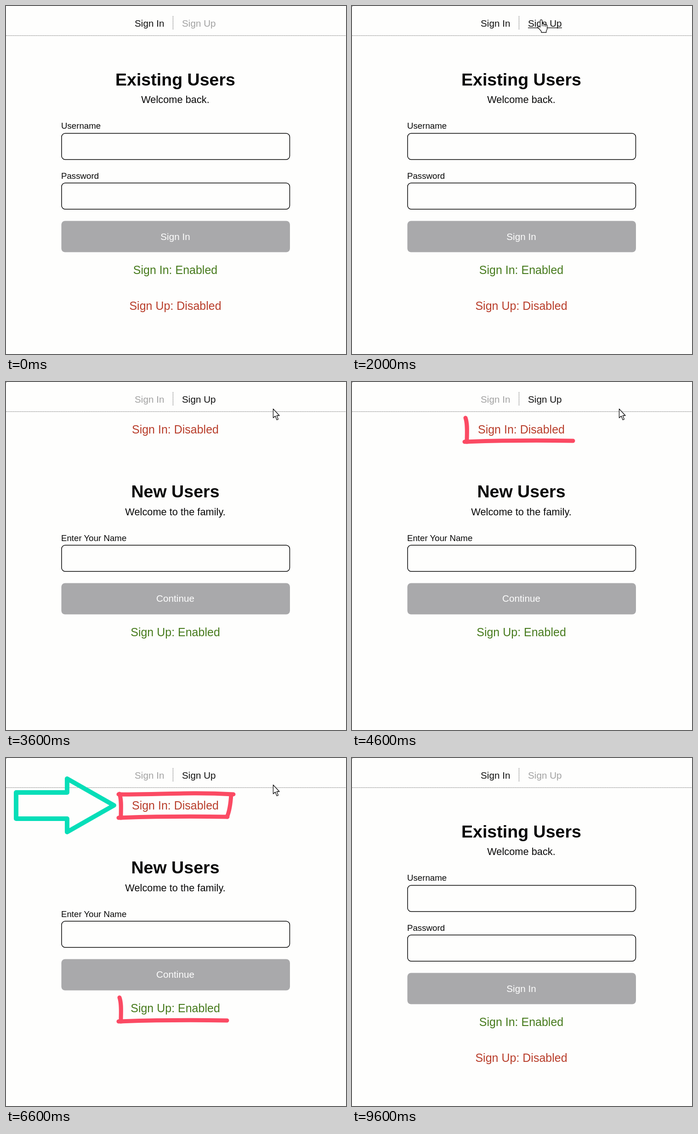
An HTML page for the animation above (9800 ms loop, 740x757 px).

```html
<!DOCTYPE html>
<html lang="en">
<head>
<meta charset="utf-8">
<title>Sign in and sign up</title>
<style>
  html, body { margin: 0; width: 100%; height: 100%; overflow: hidden; background: #fefefd; }
  svg { display: block; width: 740px; height: 757px; font-family: "Liberation Sans", Arial, sans-serif; }
  .nav, .button-text { font-size: 20.7px; }
  .title { font-size: 37.6px; font-weight: bold; }
  .intro { font-size: 21.8px; }
  .label { font-size: 18.7px; }
  .status { font-size: 25px; }
  .title, .intro, .status, .button-text { text-anchor: middle; }
  .title, .intro, .label { fill: #080808; }
  .button-text { fill: #fefefe; }
  .input { fill: none; stroke: #080808; stroke-width: 1.5; }
  .button { fill: #a9a9ab; }
  .dotted { stroke: #555; stroke-width: 1.2; stroke-dasharray: 1.25; }
  .cursor path { fill: #fff; stroke: #111; stroke-width: 1.3; stroke-linejoin: round; }
  .frame, .arrow { fill: none; stroke-linecap: round; stroke-linejoin: round; }
  .frame { stroke: #fb4a63; stroke-width: 9; }
  .arrow { stroke: #06deb8; stroke-width: 10; }
</style>
</head>
<body>
<svg viewBox="0 0 740 757">
  <defs>
    <clipPath id="clipIn"><rect id="areaIn" y="65" width="740"/></clipPath>
    <clipPath id="clipUp"><rect id="areaUp" y="143" width="740"/></clipPath>
    <g id="note">
      <g class="frame">
        <path d="M247 78C252 92 250 112 250 130"/>
        <path d="M245 130Q360 126 482 128"/>
        <path d="M481 128Q488 112 490 80"/>
        <path d="M245 79C320 81 390 73 495 79"/>
      </g>
      <g class="arrow">
        <path d="M219 112L235 103L133 45V75H22V132H133V161Z"/>
      </g>
    </g>
  </defs>

  <rect id="corner" width="1" height="1"/>
  <text id="navIn" class="nav" x="280" y="45">Sign In</text>
  <text id="navUp" class="nav" x="383" y="45">Sign Up</text>
  <path id="underline" d="M383 47.5H457" stroke="#222" stroke-width="1.4"/>
  <path class="dotted" d="M363.5 22V52M0 64.5H740"/>

  <g clip-path="url(#clipIn)">
    <text class="title" x="368.5" y="173">Existing Users</text>
    <text class="intro" x="368.5" y="211">Welcome back.</text>
    <text class="label" x="120" y="267">Username</text>
    <rect class="input" x="121" y="277" width="496.5" height="57" rx="8"/>
    <text class="label" x="120" y="376">Password</text>
    <rect class="input" x="121" y="385" width="496.5" height="57" rx="8"/>
    <rect class="button" x="120.5" y="467.5" width="497.5" height="68" rx="8"/>
    <text class="button-text" x="368.5" y="508.5">Sign In</text>
  </g>
  <text id="statusIn" class="status" x="368.5"></text>

  <g id="formUp">
    <g clip-path="url(#clipUp)">
      <text class="title" x="368.5" y="251">New Users</text>
      <text class="intro" x="368.5" y="289.5">Welcome to the family.</text>
      <text class="label" x="120" y="345.5">Enter Your Name</text>
      <rect class="input" x="121" y="355" width="496.5" height="57" rx="8"/>
      <rect class="button" x="120.5" y="437.5" width="497.5" height="68" rx="8"/>
      <text class="button-text" x="368.5" y="477.5">Continue</text>
    </g>
  </g>
  <text id="statusUp" class="status" x="368.5"></text>

  <g id="cursor" class="cursor">
    <path id="pointer" d="M.5 .5V20L5 16L8.5 24.5L11.5 23L8.2 15H14Z"/>
    <path id="hand" d="M-2.5 17V3a2.2 2.2 0 0 1 4.4 0V11a2 2 0 0 1 4 .5a2 2 0 0 1 3.6 1a1.8 1.8 0 0 1 3.3 1V20q0 3-2 5V28.5H0V26L-7 18q-1.5-3 1.5-3ZM1.9 11V15M5.9 11.5V15.5M9.5 12.5V16"/>
  </g>
</svg>
<script>
const LOOP = 9800, STEP = 200, CLICK = 2200;
const FORM_IN = 471, FORM_UP = 363;
const GREEN = '#467a1c', RED = '#b83d2a', BLACK = '#111', GRAY = '#a2a2a2';
const $ = id => document.getElementById(id);
const clamp = v => Math.min(1, Math.max(0, v));
const smooth = v => (v = clamp(v), v * v * (3 - 2 * v));
const show = (el, on) => el.style.display = on ? '' : 'none';

// Two hand-drawn notes: a red frame, then a green arrow.
const notes = [[4600, 0], [6600, 443]].map(([start, y]) => {
  const group = $('note').cloneNode(true);
  group.removeAttribute('id');
  group.setAttribute('transform', `translate(0 ${y})`);
  document.querySelector('svg').append(group);
  const strokes = name => [...group.querySelectorAll(`.${name} path`)]
    .map(path => ({ path, length: path.getTotalLength() }));
  return { start, frame: strokes('frame'), arrow: strokes('arrow') };
});

function drawStrokes(strokes, part) {
  let left = clamp(part) * strokes.reduce((sum, s) => sum + s.length, 0);
  for (const { path, length } of strokes) {
    show(path, left > 1);
    path.style.strokeDasharray = left >= length - 1 ? 'none' : `${left} 9999`;
    left -= length;
  }
}

const moves = [
  { from: 800, to: 1900, x: 690, y: 636, dx: -278, dy: -607 },
  { from: 2200, to: 3000, x: 412, y: 29, dx: 12, dy: 2 },
  { from: 3000, to: 3600, x: 424, y: 31, dx: 157, dy: 27 }
];

function drawCursor(t) {
  show($('cursor'), t >= 800);
  const move = moves.filter(m => t >= m.from).pop() || moves[0];
  const p = smooth((t - move.from) / (move.to - move.from));
  $('cursor').setAttribute('transform', `translate(${move.x + move.dx * p} ${move.y + move.dy * p})`);
  const onLink = t >= 1800 && t < 3200;
  show($('hand'), onLink);
  show($('pointer'), !onLink);
}

function setStatus(el, name, enabled, y) {
  el.textContent = `${name}: ${enabled ? 'Enabled' : 'Disabled'}`;
  el.setAttribute('fill', enabled ? GREEN : RED);
  el.setAttribute('y', y);
}

function render(time) {
  const t = Math.floor(time % LOOP / STEP) * STEP;
  const reset = t >= 9600;
  const signUp = t >= CLICK && !reset;
  const hover = t >= 1800 && t < CLICK;
  const p = reset ? 0 : smooth((t - 2100) / 800);
  const heightIn = FORM_IN * (1 - p), heightUp = FORM_UP * p;

  show($('corner'), t >= 200);
  $('navIn').setAttribute('fill', signUp ? GRAY : BLACK);
  $('navUp').setAttribute('fill', signUp || hover ? BLACK : GRAY);
  show($('underline'), hover);
  $('areaIn').setAttribute('height', heightIn);
  $('areaUp').setAttribute('height', heightUp);
  $('formUp').setAttribute('transform', `translate(0 ${heightIn})`);
  setStatus($('statusIn'), 'Sign In', !signUp, 112 + heightIn);
  setStatus($('statusUp'), 'Sign Up', signUp, 190 + heightIn + heightUp);
  drawCursor(reset ? 0 : t);

  for (const { start, frame, arrow } of notes) {
    const step = (t - start) / STEP;
    const active = step >= 0 && !reset;
    drawStrokes(frame, active ? .49 + .36 * step : 0);
    drawStrokes(arrow, active ? .29 + .355 * (step - 3) : 0);
  }
}

const began = performance.now();
function tick() {
  render(performance.now() - began);
  requestAnimationFrame(tick);
}
tick();
</script>
</body>
</html>
```
